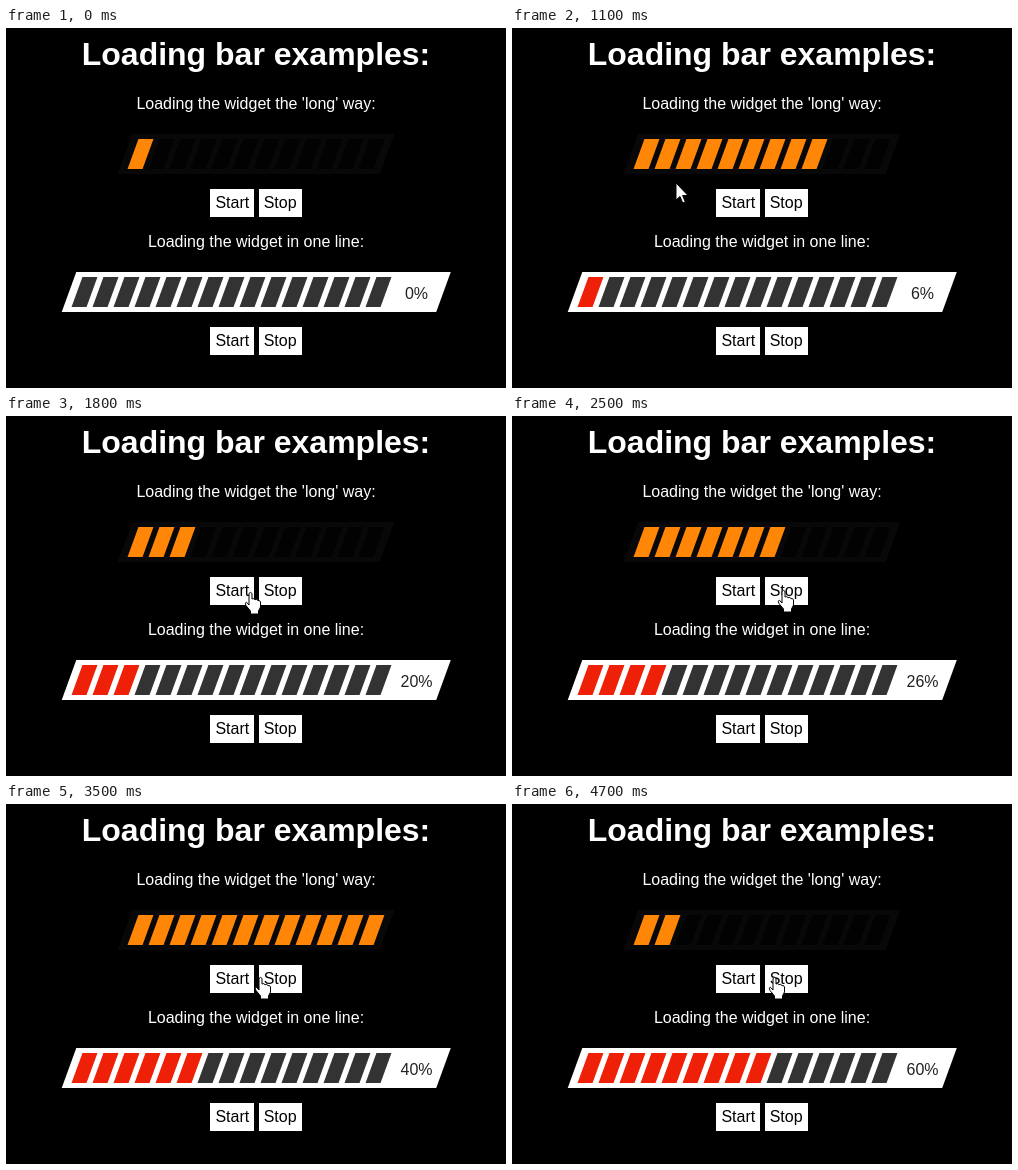
Animation of 500x360 px, one loop 5 s. Source, as an HTML page:

```html
<!DOCTYPE html>
<html lang="en">
<head>
<meta charset="utf-8">
<title>Loading bar examples</title>
<style>
  html, body { margin: 0; width: 100%; height: 100%; overflow: hidden; background: #000; }
  svg { display: block; }
  text { font: 16px "Liberation Sans", Arial, sans-serif; text-anchor: middle; fill: #fff; }
  .title { font-size: 32px; font-weight: bold; }
  .label { fill: #000; }
  .percent { fill: #222; }
</style>
</head>
<body>
<svg id="stage" width="500" height="360" viewBox="0 0 500 360"></svg>
<script>
const LOOP = 5000, TICK = 100;
const stage = document.getElementById('stage');

function add(parent, tag, attrs, content = '') {
  const node = document.createElementNS('http://www.w3.org/2000/svg', tag);
  for (const name in attrs) node.setAttribute(name, attrs[name]);
  node.textContent = content;
  return parent.appendChild(node);
}

const write = (content, x, y, className = '') =>
  add(stage, 'text', { x, y, class: className }, content);

function addButtons(y) {
  for (const [label, x, width, center] of [['Start', 204, 44, 226.3], ['Stop', 253, 43, 274.1]]) {
    add(stage, 'rect', { x, y, width, height: 28, fill: '#fff' });
    write(label, center, y + 19, 'label');
  }
}

// Builds a slanted bar and returns a function that lights its first cells.
function addBar({ x, y, width, cells, back, off, on }) {
  const group = add(stage, 'g', { transform: `translate(${x} ${y}) skewX(-20)` });
  add(group, 'rect', { y: -20, width, height: 40, fill: back });
  const rects = Array.from({ length: cells }, (_, i) =>
    add(group, 'rect', { x: 8 + 21 * i, y: -15, width: 15, height: 30 }));
  return lit => rects.forEach((rect, i) => rect.setAttribute('fill', i < lit ? on : off));
}

write('Loading bar examples:', 250, 37, 'title');
write("Loading the widget the 'long' way:", 250, 81);
const lightTop = addBar({
  x: 119, y: 126, width: 262, cells: 12, back: '#080808', off: '#020202', on: '#ff8606'
});
addButtons(161);
write('Loading the widget in one line:', 250, 219);
const lightBottom = addBar({
  x: 63, y: 264, width: 374.5, cells: 15, back: '#fff', off: '#333', on: '#ee2008'
});
const percent = write('0%', 410.5, 271, 'percent');
addButtons(299);

const cursor = add(stage, 'path', { fill: '#fff', stroke: '#000', 'stroke-linejoin': 'round' });
const ARROW = 'M0 0V17L4 13.5 6.7 20 9.3 19 6.6 12.5H12Z';
const HAND = 'M-1 1.5Q.5 -.8 2 1.5V7Q4 5.8 5 7.7 7 6.6 8 8.6 10 8 10.5 10V15L8.5 19V22H.5V19' +
  'L-4 13.5Q-5.8 10.5 -3.6 10.2L-1 13Z';

// Cursor hot spot: time, x, y
const PATH = [
  [600, 54, 117], [700, 62, 122], [1400, 230, 177], [1600, 230, 177], [2100, 269, 175],
  [2400, 269, 175], [2500, 271, 174], [2800, 233, 172], [3100, 233, 172], [3700, 262, 173],
  [LOOP, 262, 173]
];

function cursorAt(time) {
  const next = PATH.findIndex(key => key[0] > time);
  const [t0, x0, y0] = PATH[next - 1], [t1, x1, y1] = PATH[next];
  const p = (time - t0) / (t1 - t0), ease = p * p * (3 - 2 * p);
  return [Math.round(x0 + (x1 - x0) * ease), Math.round(y0 + (y1 - y0) * ease)];
}

const overButton = (x, y) =>
  y >= 161 && y < 189 && (x >= 204 && x < 248 || x >= 253 && x < 296);
const ticksSince = (start, time, max) =>
  Math.max(0, Math.min(max, Math.floor((time - start) / TICK)));

function draw(now) {
  const time = Math.floor(now % LOOP / TICK) * TICK;

  // The upper bar runs, is stopped, runs again, and is stopped.
  lightTop((1 + ticksSince(300, time, 19) + ticksSince(3000, time, 8)) % 13);

  const loaded = Math.max(0, Math.floor((time - 200) / 500));
  lightBottom(loaded);
  percent.textContent = Math.floor(loaded * 100 / 15) + '%';

  const visible = time >= PATH[0][0];
  cursor.setAttribute('visibility', visible ? 'visible' : 'hidden');
  if (visible) {
    const [x, y] = cursorAt(time);
    cursor.setAttribute('d', overButton(x, y) ? HAND : ARROW);
    cursor.setAttribute('transform', `translate(${x} ${y})`);
  }
}

let start;
function frame(now) {
  start ??= now;
  draw(now - start);
  requestAnimationFrame(frame);
}
draw(0);
requestAnimationFrame(frame);
</script>
</body>
</html>
```
